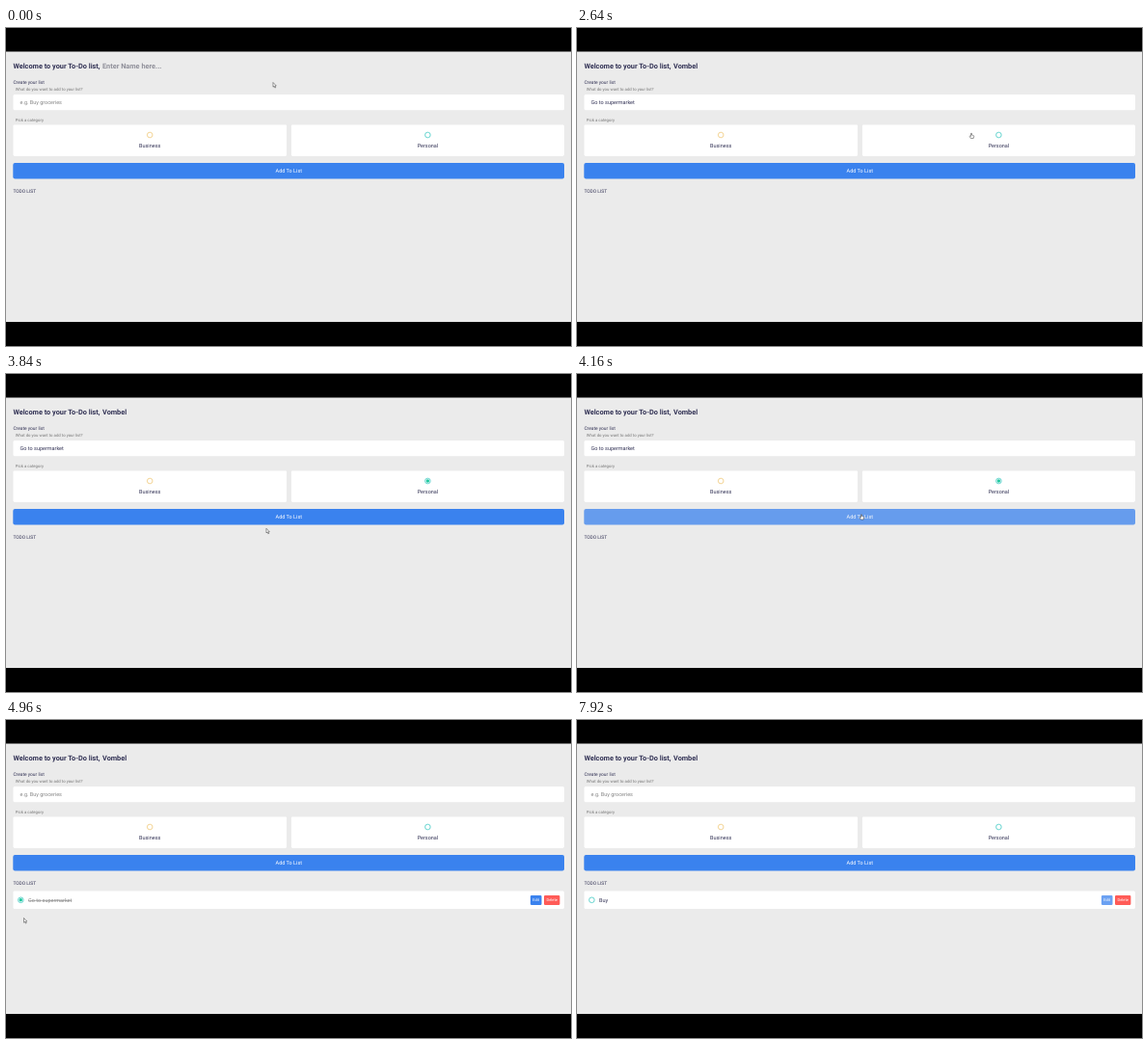
These frames come from a looping animation (586x330 px, 8 s). An HTML page:

```html
<!DOCTYPE html>
<html lang="en">
<head>
<meta charset="utf-8">
<title>To-Do list</title>
<style>
  html, body { margin: 0; width: 100%; height: 100%; overflow: hidden; background: #000; }
  svg { display: block; width: 586px; height: 330px; }
  text { font: 5.49px Roboto, sans-serif; fill: #313154; text-rendering: geometricPrecision; white-space: pre; }
  .title { font-size: 7.33px; font-weight: 700; }
  .head { font-size: 4.89px; }
  .label { font-size: 4.27px; fill: #777; }
  .mid { text-anchor: middle; }
  .white { fill: #fff; }
  .small { font-size: 4.07px; }
  .empty { fill: #858585; }
  .title.empty { fill: #8f8f99; }
  .done { fill: #888; text-decoration: line-through; }
  .panel { fill: #fff; filter: drop-shadow(0 .6px .6px rgba(0, 0, 0, .1)); }
  .blue { fill: #3a82ee; }
  .red { fill: #ff5b57; }
  .ring { fill: none; stroke-width: .65; }
  .cursor > * { fill: #fff; stroke: #222; stroke-width: .45; stroke-linejoin: round; }
</style>
</head>
<body>
<svg id="stage" viewBox="0 0 586 330"></svg>
<script>
const LOOP = 8000, STEP = 80;
const NAME = "Vombel", TASK = "Go to supermarket";
const GOLD = "#f0c674", TEAL = "#3bc8c2", GREEN = "#22c9a0";

const stage = document.getElementById("stage");
const rect = (x, y, w, h, cls, r = 1.4) =>
  `<rect x="${x}" y="${y}" width="${w}" height="${h}" rx="${r}" class="${cls}"/>`;
const text = (x, y, str, cls = "", id = "") =>
  `<text x="${x}" y="${y}" class="${cls}" id="${id}">${str}</text>`;
const bubble = (x, y, color, id = "") =>
  `<circle cx="${x}" cy="${y}" r="3" class="ring" stroke="${color}" stroke-width="2" opacity=".3"/>
   <circle cx="${x}" cy="${y}" r="2.75" class="ring" stroke="${color}"/>
   ${id && `<circle cx="${x}" cy="${y}" r="1.75" fill="${GREEN}" id="${id}"/>`}`;

stage.innerHTML = `
  <rect width="586" height="330"/>
  <rect y="24.5" width="586" height="280.5" fill="#ebebeb"/>
  ${text(7.4, 41.5, "Welcome to your To-Do list,", "title")}
  ${text(100, 41.5, "", "title", "name")}
  ${text(7.4, 57.7, "Create your list", "head")}
  ${text(9.8, 65.2, "What do you want to add to your list?", "label")}
  ${rect(7.3, 69, 571.7, 16.4, "panel")}
  ${text(14.6, 79, "", "", "entry")}
  ${text(9.8, 96.9, "Pick a category", "label")}
  ${rect(7.3, 100.2, 284, 32.7, "panel")}
  ${rect(295.7, 100.2, 283.3, 32.7, "panel")}
  ${bubble(149.2, 111, GOLD)}
  ${bubble(437.4, 111, TEAL, "picked")}
  ${text(149.2, 124, "Business", "mid")}
  ${text(437.4, 124, "Personal", "mid")}
  <g id="add">
    ${rect(7.3, 140, 571.7, 16.6, "blue", 2)}
    ${text(293.3, 150.2, "Add To List", "mid white")}
  </g>
  ${text(7.4, 170.9, "TODO LIST", "head")}
  <g id="item">
    ${rect(7.3, 177.2, 571.7, 19, "panel")}
    ${bubble(15.3, 186.8, TEAL, "checked")}
    ${text(23.1, 188.8, "", "", "task")}
    <g id="edit">
      ${rect(543.9, 181.9, 11.6, 10, "blue", 1.2)}
      ${text(549.7, 188.3, "Edit", "mid white small")}
    </g>
    ${rect(558, 181.9, 16.4, 10, "red", 1.2)}
    ${text(566.2, 188.3, "Delete", "mid white small")}
  </g>
  <g id="cursor" class="cursor">
    <path id="arrow" d="M0 0V4.7L1.1 3.8 1.9 5.6 2.7 5.2 1.9 3.5H3.3Z"/>
    <path id="hand" d="M-.5 .4Q0 -.3 .5 .4V2.1L2.3 2.6Q2.8 2.8 2.7 3.5L2.2 5.5H-.6L-2 3.4Q-1.8 2.7 -.5 3.4Z"/>
    <path id="beam" d="M-.9 -2.5H.9M0 -2.5V2.5M-.9 2.5H.9" style="fill:none"/>
  </g>`;

const el = {};
stage.querySelectorAll("[id]").forEach(n => { if (n.id) el[n.id] = n; });

// pointer stops: time, x, y
const path = [
  [0, 277, 56.5], [240, 277, 56.5], [400, 120, 39], [880, 130, 39],
  [1120, 165, 80], [2320, 168, 83], [2720, 437, 112], [2880, 437, 112],
  [3120, 224, 114.2], [3600, 245, 175], [4080, 295, 145.5], [4240, 295, 145.5],
  [4560, 16, 187], [4640, 16, 187], [4720, 20, 219], [4880, 20, 219],
  [4960, 18.5, 205.5], [5280, 16, 187], [5600, 16, 187],
  [6160, 526.5, 187], [6320, 549, 187], [8000, 549, 187]
];
const hidden = [[480, 880], [1200, 2400], [6480, 8000]];

const within = (t, a, b) => t >= a && t < b;
const inBox = (p, x0, y0, x1, y1) => within(p.x, x0, x1) && within(p.y, y0, y1);
const show = (node, on) => { node.style.display = on ? "" : "none"; };

function pointer(t) {
  const i = Math.max(1, path.findIndex(p => p[0] > t));
  const [t0, x0, y0] = path[i - 1], [t1, x1, y1] = path[i];
  const k = (t - t0) / (t1 - t0), e = k * k * (3 - 2 * k);
  return { x: x0 + (x1 - x0) * e, y: y0 + (y1 - y0) * e };
}

// part of a string typed evenly from a to b
function typed(str, t, a, b) {
  const k = Math.min(1, Math.max(0, (t - a) / (b - a)));
  return str.slice(0, Math.round(str.length * k));
}

function field(node, value, hint) {
  node.textContent = value || hint;
  node.classList.toggle("empty", !value);
}

function cursorShape(p, hasItem) {
  const onBubble = hasItem && inBox(p, 11, 183, 20, 191);
  const onButton = hasItem && inBox(p, 543.9, 181.9, 574.4, 192);
  if (onBubble || onButton || inBox(p, 7, 140, 579, 157) ||
      inBox(p, 7, 100, 291, 133) || inBox(p, 296, 100, 579, 133)) return "hand";
  if (inBox(p, 100, 34, 579, 44) || inBox(p, 7, 69, 579, 86) ||
      hasItem && inBox(p, 23, 182, 542, 192)) return "beam";
  return "arrow";
}

function draw(t) {
  const p = pointer(t), hasItem = t >= 4320;
  field(el.name, typed(NAME, t, 400, 800), "Enter Name here...");
  field(el.entry, hasItem ? "" : typed(TASK, t, 1440, 2320), "e.g. Buy groceries");
  show(el.picked, within(t, 2880, 4320));

  show(el.item, hasItem);
  const done = within(t, 4640, 5520);
  show(el.checked, done);
  el.task.classList.toggle("done", done);
  el.task.textContent = t < 7520
    ? typed(TASK, t, 7440, 6560)
    : typed("Buy", t, 7520, 7920);

  el.add.style.opacity = inBox(p, 7.3, 140, 579, 156.6) ? .75 : 1;
  el.edit.style.opacity = inBox(p, 543.9, 181.9, 555.5, 192) ? .75 : 1;

  const shape = cursorShape(p, hasItem);
  for (const s of ["arrow", "hand", "beam"]) show(el[s], s === shape);
  show(el.cursor, !hidden.some(([a, b]) => within(t, a, b)));
  el.cursor.setAttribute("transform", `translate(${p.x} ${p.y})`);
}

const start = performance.now();
function frame() {
  const t = (performance.now() - start) % LOOP;
  draw(Math.floor(t / STEP) * STEP);
  requestAnimationFrame(frame);
}
frame();
</script>
</body>
</html>
```
